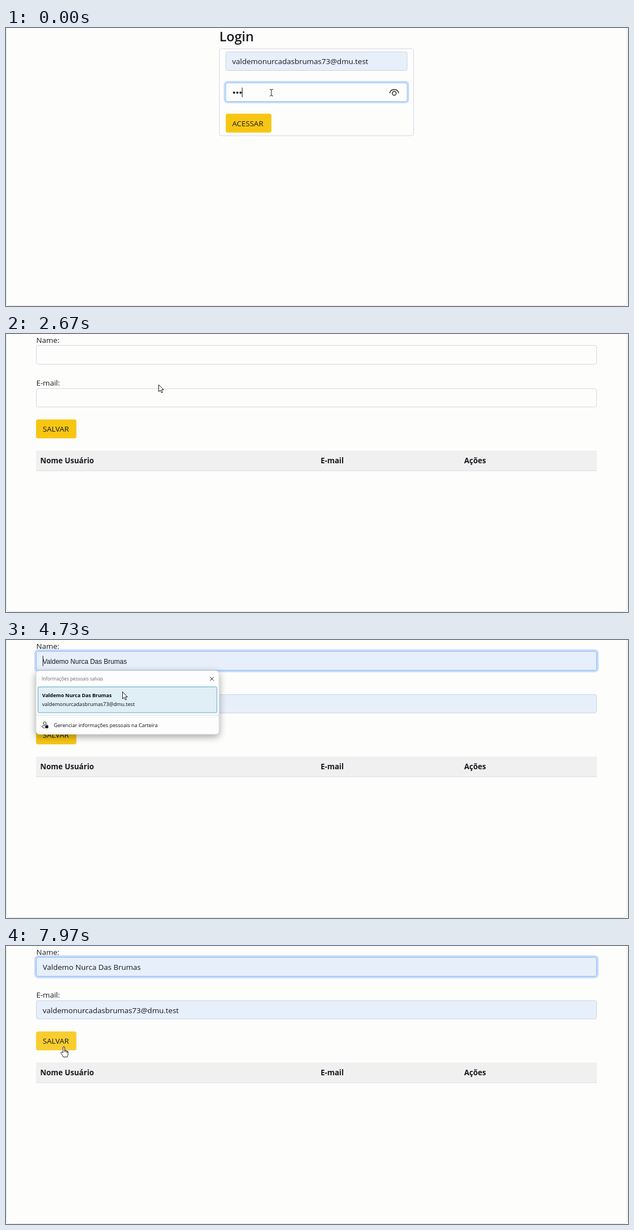
Write an HTML page that moves like this. It is 1118 by 501 pixels and loops after 8 s.

```html
<!DOCTYPE html>
<html lang="pt-BR">
<head>
<meta charset="utf-8">
<title>Login</title>
<style>
html, body { margin: 0; width: 100%; height: 100%; overflow: hidden; background: #fdfdfc; }
svg { display: block; }
text { font: 13.5px "Open Sans", "Noto Sans", sans-serif; fill: #16181b; white-space: pre; }
.title { font-size: 23.6px; font-weight: 600; }
.head { font-weight: 700; }
.small { font-size: 9.2px; fill: #0c0d0f; }
.hint { font-size: 8.4px; fill: #66686c; }
.strong { font-size: 9px; font-weight: 700; fill: #08090a; }
.preview { font: 12px "Liberation Sans", Arial, sans-serif; }
.field { fill: #fdfdfc; stroke: #d5d6e4; }
.filled { fill: #e7effb; stroke: #cbd3e2; }
.focus { stroke: #8fbcf8; }
.glow { fill: none; stroke: #c3dafb; stroke-width: 3; }
.button { fill: #f7c613; }
.hover { fill: #f9cd30; }
.line { fill: none; stroke: #212529; }
.caret { stroke: #111; stroke-width: 1; }
</style>
</head>
<body>
<svg width="1118" height="501" viewBox="0 0 1118 501">
  <defs>
    <filter id="shadow" x="-15%" y="-30%" width="130%" height="170%">
      <feDropShadow dx="0" dy="4" stdDeviation="6.5" flood-color="#000" flood-opacity=".36"/>
    </filter>
  </defs>
  <rect x=".5" y="-2.5" width="1116" height="503" rx="7" fill="#fdfdfc" stroke="#dddedc"/>

  <g id="login">
    <text class="title" x="383.5" y="23.5">Login</text>
    <rect x="383.5" y="37.5" width="349" height="156.5" rx="3" fill="none" stroke="#d3d4e6"/>
    <rect class="field filled" x="395" y="43" width="326" height="33.5" rx="3.5"/>
    <text class="mail" x="406.5" y="65"></text>
    <rect class="glow" x="393" y="97" width="330" height="37" rx="5"/>
    <rect class="field focus" x="395" y="99" width="326" height="33.5" rx="3.5"/>
    <g id="dots" fill="#16181b"></g>
    <path id="keyCaret" class="caret" d="M0 107.500V124.500"/>
    <path class="line" stroke-width="1.4" d="M689.500 117.500C692 108.500 703.500 108.500 706 117.500"/>
    <circle class="line" stroke-width="1.4" cx="697.800" cy="117.800" r="3.500"/>
    <rect id="enter" class="button" x="395" y="154.500" width="82" height="34" rx="3.500"/>
    <text x="406.500" y="177">ACESSAR</text>
  </g>

  <g id="form">
    <text x="54.500" y="15.500">Name:</text>
    <rect id="nameGlow" class="glow" x="52.500" y="18.500" width="1011" height="38" rx="5"/>
    <rect id="nameField" class="field" x="54.500" y="20.500" width="1007" height="34" rx="3.500"/>
    <text id="preview" class="name preview" x="66" y="43.300"></text>
    <text id="nameText" class="name" x="66" y="43.300"></text>
    <path id="nameCaret" class="caret" d="M0 28.500V47"/>
    <text x="54.500" y="92.700">E-mail:</text>
    <rect id="mailField" class="field" x="54.500" y="98.500" width="1007" height="33" rx="3.500"/>
    <text id="mailText" class="mail" x="66" y="120.500"></text>
    <rect id="save" class="button" x="54" y="154" width="72.500" height="34" rx="3.500"/>
    <text x="66" y="176.300">SALVAR</text>
    <rect x="54" y="210" width="1008" height="36.500" fill="#f0f0f0"/>
    <path d="M54 246.500H1062" stroke="#dcdce6"/>
    <text class="head" x="61.500" y="233">Nome Usuário</text>
    <text class="head" x="565.500" y="233">E-mail</text>
    <text class="head" x="823.500" y="233">Ações</text>
    <g id="popup">
      <rect x="54" y="55" width="329" height="115" rx="6" fill="#fdfdfd" stroke="#c6c7cc" stroke-width=".7" filter="url(#shadow)"/>
      <text class="hint" x="64" y="73">Informações pessoais salvas</text>
      <path class="line" d="M366.500 66.500l7 7m0 -7l-7 7"/>
      <rect id="option" x="57.500" y="84.500" width="321.500" height="46.500" rx="1.500" fill="#e0eef6" stroke="#5ba7c7"/>
      <text class="name strong" x="65" y="102.700"></text>
      <text class="mail small" x="65" y="119"></text>
      <path d="M54 135.500H383" stroke="#dcdde2"/>
      <circle class="line" cx="69.500" cy="150" r="2.500"/>
      <path class="line" d="M70 154.500H66.500Q64.500 154.500 64.500 156.500Q65.500 158.500 69.500 158.500"/>
      <rect x="70.500" y="154" width="5.500" height="5" rx="1" fill="#16181b"/>
      <path class="line" stroke-width=".9" d="M72 154V153Q73.250 151.500 74.500 153V154"/>
      <text class="small" x="86" y="156.700">Gerenciar informações pessoais na Carteira</text>
    </g>
  </g>

  <g id="cursor" fill="#fff" stroke="#16181b" stroke-linejoin="round">
    <path id="arrow" d="M.5 .5V13L3.400 10.300L5.500 15L7.500 14.100L5.500 9.500H9.300Z"/>
    <path id="beam" fill="none" d="M-3 -5.500Q0 -5.500 0 -4Q0 -5.500 3 -5.500M0 -4V5M-3 6.500Q0 6.500 0 5Q0 6.500 3 6.500"/>
    <path id="hand" d="M-1.500 10V1Q-1.500 -.5 0 -.5T1.500 1V6Q3.500 5 4 7Q5.500 6 6 7.800Q7.500 7.200 7.500 9V13Q7.500 15 6 18H-1Q-2.500 14.500 -5.300 11.500Q-5.500 9 -3.500 9.200ZM1.500 6V9M4 7V10M6 8V10.500"/>
  </g>
</svg>
<script>
const LOOP = 8000, PAGE = 1900, OPEN = 3450, PICK = 5300;
const KEYS = [120, 260, 400, 540, 680, 900];
// time, x, y of the pointer
const PATH = [
  [0, 477, 116], [980, 477, 116], [1360, 446, 171], [2050, 446, 171],
  [2670, 274, 91], [3250, 236, 40], [3650, 236, 40], [4100, 233, 76],
  [4600, 209, 93], [5500, 209, 98], [6200, 180, 145], [6430, 176, 153],
  [6750, 172, 160], [7250, 104, 182], [8000, 104, 182]
];
const NAME = "Valdemo Nurca Das Brumas";
const MAIL = "valdemonurcadasbrumas73@dmu.test";

const $ = id => document.getElementById(id);
const show = (id, on) => $(id).style.display = on ? "" : "none";
const fill = (cls, value) => document.querySelectorAll("." + cls).forEach(el => el.textContent = value);
const lit = (now, since) => (now - since) % 1000 < 500;
const inside = ([x, y], l, t, r, b) => x >= l && x <= r && y >= t && y <= b;

fill("name", NAME);
fill("mail", MAIL);
for (let i = 0; i < 9; i++) {
  const dot = document.createElementNS("http://www.w3.org/2000/svg", "circle");
  dot.setAttribute("cx", 410 + i * 5.8);
  dot.setAttribute("cy", 116.5);
  dot.setAttribute("r", 2);
  $("dots").append(dot);
}

function pointer(t) {
  const i = PATH.findIndex(p => p[0] > t);
  const [t0, x0, y0] = PATH[i - 1], [t1, x1, y1] = PATH[i];
  const u = (t - t0) / (t1 - t0), k = u * u * (3 - 2 * u);
  return [x0 + (x1 - x0) * k, y0 + (y1 - y0) * k];
}

function draw(t) {
  const pos = pointer(t);
  const onLogin = t < PAGE, open = t >= OPEN && t < PICK, picked = t >= PICK;
  const onOption = open && inside(pos, 57, 84, 379, 131);
  const onEnter = onLogin && inside(pos, 395, 154, 477, 188);
  const onSave = !onLogin && !open && inside(pos, 54, 154, 126, 188);
  const onField = onLogin
    ? inside(pos, 395, 43, 721, 77) || inside(pos, 395, 99, 721, 133)
    : inside(pos, 54, 20, 1062, 55) || inside(pos, 54, 98, 1062, 132);

  show("login", onLogin);
  show("form", !onLogin);

  const typed = KEYS.filter(k => k <= t);
  const count = 3 + typed.length;
  [...$("dots").children].forEach((dot, i) => dot.style.display = i < count ? "" : "none");
  $("keyCaret").setAttribute("transform", `translate(${Math.round(406.5 + count * 5.8) + .5})`);
  show("keyCaret", lit(t, typed.at(-1) || 0));
  $("enter").classList.toggle("hover", onEnter);

  const focused = t >= OPEN, filled = onOption || picked;
  show("nameGlow", focused);
  $("nameField").classList.toggle("filled", filled);
  $("nameField").classList.toggle("focus", focused);
  $("mailField").classList.toggle("filled", filled);
  show("preview", onOption);
  show("nameText", picked);
  show("mailText", filled);
  const end = picked ? $("nameText").getComputedTextLength() : 0;
  $("nameCaret").setAttribute("transform", `translate(${Math.floor(66 + end) + .5})`);
  show("nameCaret", focused && lit(t, picked ? PICK : OPEN));
  show("popup", open);
  show("option", onOption);
  $("save").classList.toggle("hover", onSave);

  const hand = onEnter || onSave, beam = !hand && !open && onField;
  show("hand", hand);
  show("beam", beam);
  show("arrow", !hand && !beam);
  $("cursor").setAttribute("transform", `translate(${pos.map(Math.round)})`);
}

function tick(now) {
  draw(now % LOOP);
  requestAnimationFrame(tick);
}
draw(0);
requestAnimationFrame(tick);
</script>
</body>
</html>
```
